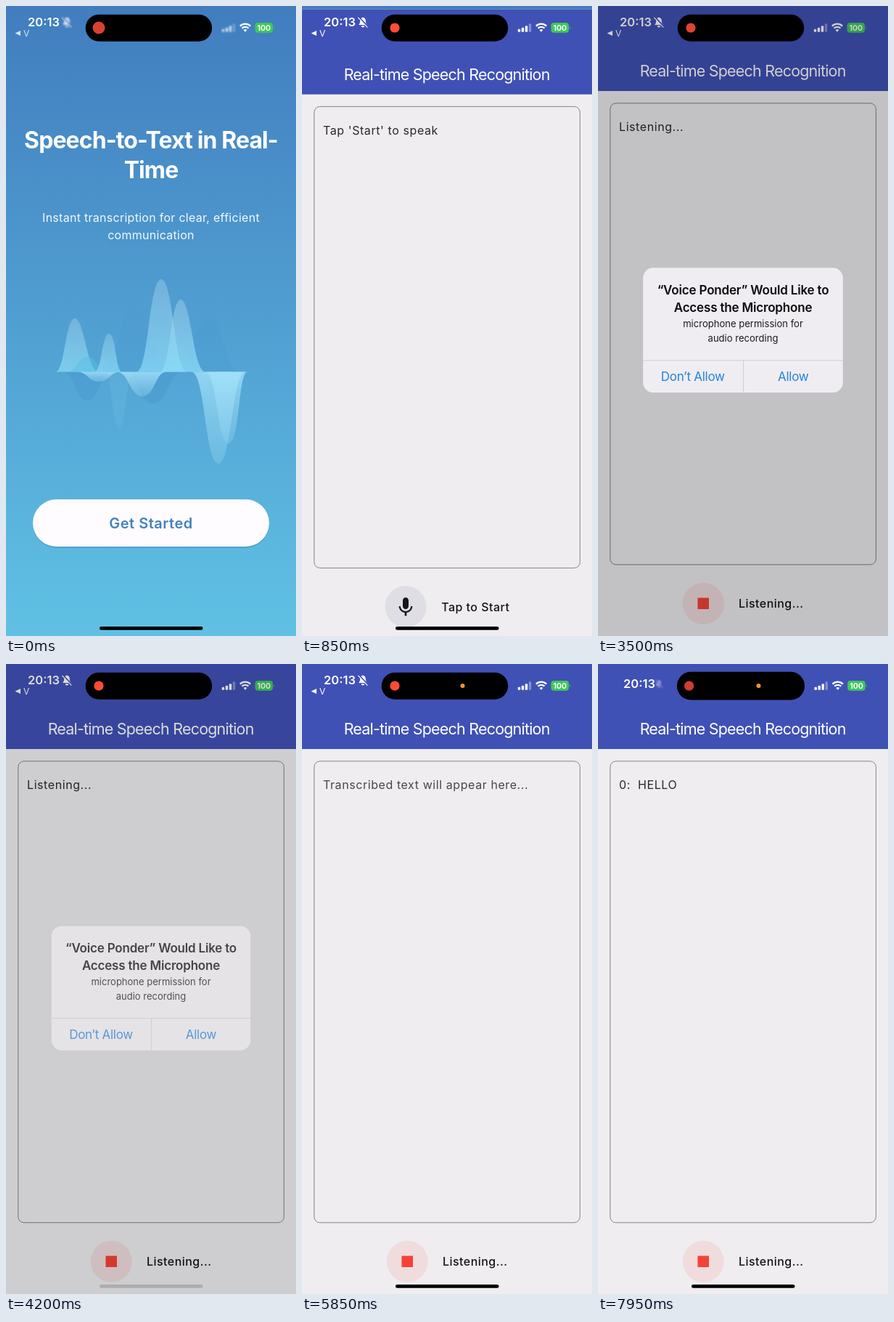
These frames come from a looping animation (400 by 867 pixels, 8000 ms). An HTML page:

```html
<!DOCTYPE html>
<html lang="en">
<head>
<meta charset="utf-8">
<title>Speech-to-Text</title>
<style>
html, body { margin: 0; width: 100%; height: 100%; overflow: hidden; background: #efedf0; }
svg { display: block; width: 100%; height: 100%; font-family: Inter, "Noto Sans", sans-serif; }
.mid { text-anchor: middle; }
.w { fill: #fff; }
.head { font-size: 32px; font-weight: 700; letter-spacing: -.9px; }
.sub { font-size: 16px; letter-spacing: .28px; fill-opacity: .94; }
.cta { font-size: 20px; font-weight: 600; letter-spacing: .5px; fill: #4380be; }
.bar { font-size: 21.5px; letter-spacing: -.8px; }
.body { font-size: 16px; letter-spacing: .58px; fill: #29282b; }
.status { font-size: 16px; font-weight: 500; letter-spacing: .45px; fill: #141316; }
.ask { font-size: 17px; font-weight: 600; letter-spacing: -.2px; fill: #0b0a0c; }
.why { font-size: 13px; fill: #1c1b1e; }
.btn { font-size: 17px; letter-spacing: -.3px; fill: #2483dc; }
</style>
</head>
<body>
<svg viewBox="0 0 400 867" preserveAspectRatio="none">
  <defs>
    <linearGradient id="sky" x2="0" y2="1">
      <stop stop-color="#417dbf"/><stop offset="1" stop-color="#60c1e4"/>
    </linearGradient>
    <linearGradient id="up" x2="0" y2="1">
      <stop stop-color="#9fd0ea" stop-opacity=".5"/><stop offset="1" stop-color="#8adcf8" stop-opacity=".85"/>
    </linearGradient>
    <linearGradient id="down" x2="0" y2="1">
      <stop stop-color="#a4e4fb" stop-opacity=".9"/><stop offset="1" stop-color="#93d3ee" stop-opacity=".4"/>
    </linearGradient>
    <filter id="soft" x="-50%" y="-50%" width="200%" height="200%">
      <feGaussianBlur id="blur" stdDeviation="0"/>
    </filter>
  </defs>

  <g id="welcome">
    <rect width="400" height="867" fill="url(#sky)"/>
    <g class="w mid">
      <text class="head" x="200" y="196">Speech-to-Text in Real-</text>
      <text class="head" x="200" y="237">Time</text>
      <text class="sub" x="200" y="297">Instant transcription for clear, efficient</text>
      <text class="sub" x="200" y="321">communication</text>
    </g>
    <g id="waves"></g>
    <rect x="37" y="680.5" width="326" height="65" rx="32.5" fill="#2c6c9c" opacity=".4"/>
    <rect x="37" y="679" width="326" height="65" rx="32.5" fill="#fefcff"/>
    <text class="cta mid" x="200" y="719">Get Started</text>
  </g>

  <g id="page">
    <rect width="400" height="867" fill="#efedf0"/>
    <rect width="400" height="117" fill="#4051b5"/>
    <text class="bar w mid" x="199.6" y="97">Real-time Speech Recognition</text>
    <rect x="16.8" y="133.8" width="366.6" height="635" rx="8" fill="none" stroke="#858387"/>
    <text id="out" class="body" x="29" y="172"></text>
    <g id="idle">
      <circle cx="143" cy="822" r="28.5" fill="#dfdee5"/>
      <path transform="translate(127 806.7) scale(1.333)" fill="#17161a" d="M12 14c1.66 0 2.99-1.34 2.99-3L15 5c0-1.66-1.34-3-3-3S9 3.34 9 5v6c0 1.66 1.34 3 3 3zm5.3-3c0 3-2.54 5.1-5.3 5.1S6.7 14 6.7 11H5c0 3.41 2.72 6.23 6 6.72V21h2v-3.28c3.28-.48 6-3.3 6-6.72h-1.7z"/>
      <text class="status" x="192.3" y="828">Tap to Start</text>
    </g>
    <g id="live">
      <circle cx="145.3" cy="822.3" r="28.5" fill="#f0dcdd"/>
      <rect x="137.5" y="814.5" width="15.5" height="15.5" fill="#f44336"/>
      <text class="status" x="194" y="828">Listening...</text>
    </g>
  </g>

  <g id="tray" class="w">
    <g id="clock"><text x="30" y="28" font-size="16.5" font-weight="600">20:13</text></g>
    <g id="bell">
      <path d="M78 26c2-1.8 2-3.6 2.2-6 .2-2.600 1.700-4.200 3.800-4.200s3.600 1.600 3.800 4.200c.2 2.400.2 4.200 2.200 6zM81.800 27.200h4.400a2.200 2.200 0 0 1-4.400 0z"/>
      <path d="M78.600 15.500 91 28.500" stroke="#4051b5" stroke-width="2"/>
      <path d="M77.600 16.200 90 29.200" stroke="#fff" stroke-width="1.200" stroke-linecap="round"/>
    </g>
    <g id="back">
      <path d="M12.500 37.500 20 34v7z"/>
      <text x="24" y="42" font-size="12">V</text>
    </g>
    <g id="radio">
      <g id="bars"></g>
      <g fill="none" stroke="#fff" stroke-width="2.300">
        <path d="M322.800 27.600a10.300 10.300 0 0 1 14.400 0M325.500 30.600a6.500 6.500 0 0 1 9 0"/>
      </g>
      <path d="M327.600 33.100a3.600 3.600 0 0 1 4.800 0L330 35.700z"/>
      <rect x="343.500" y="23" width="24.500" height="13.800" rx="4" fill="#3dc95a"/>
      <path d="M368.900 28v4q1.500-.6 1.500-2t-1.500-2" fill="#3dc95a" opacity=".7"/>
      <text class="mid" x="355.800" y="33.800" font-size="10.500" font-weight="700">100</text>
    </g>
  </g>
  <rect id="dim" width="400" height="867"/>
  <rect id="island"/>
  <circle id="rec" cy="30"/>
  <circle id="mic" cx="221.500" cy="30" r="3" fill="#f59425"/>

  <g id="alert">
    <rect x="62.700" y="360.700" width="274.600" height="171" rx="14" fill="#efedf1"/>
    <g class="mid">
      <text class="ask" x="200" y="397">“Voice Ponder” Would Like to</text>
      <text class="ask" x="200" y="421">Access the Microphone</text>
      <text class="why" x="200" y="442">microphone permission for</text>
      <text class="why" x="200" y="462">audio recording</text>
      <text class="btn" x="131" y="516">Don’t Allow</text>
      <text class="btn" x="269" y="516">Allow</text>
    </g>
    <path d="M62.700 487.500h274.600M200.500 487.500v44" stroke="#cfcdd2"/>
  </g>
  <rect id="home" x="129" y="854" width="142.500" height="4.800" rx="2.400"/>
</svg>
<script>
const LOOP = 8000;
const $ = id => document.getElementById(id);
const set = (id, attrs) => { for (const k in attrs) $(id).setAttribute(k, attrs[k]); };
const ramp = (t, from, len) => Math.min(1, Math.max(0, (t - from) / len));
const smooth = p => p * p * (3 - 2 * p);
const easeOut = p => 1 - (1 - p) ** 3;
const mix = (a, b, p) => a + (b - a) * p;

// Cubic Bézier easing, solved by bisection.
function bezier(x1, y1, x2, y2, x) {
  const at = (a, b, s) => 3 * (1 - s) ** 2 * s * a + 3 * (1 - s) * s * s * b + s ** 3;
  let lo = 0, hi = 1;
  for (let i = 0; i < 24; i++) {
    const s = (lo + hi) / 2;
    if (at(x1, x2, s) < x) lo = s; else hi = s;
  }
  return at(y1, y2, lo);
}

// Bell from x0 to x1 with its tip at (xm, y), standing on the centre line.
function bell(x0, xm, x1, y, fill, opacity) {
  const b = 503.5, l = (x0 + xm) / 2, r = (xm + x1) / 2;
  return `<path d="M${x0} ${b}C${l} ${b} ${l} ${y} ${xm} ${y}S${r} ${b} ${x1} ${b}z" fill="${fill}" opacity="${opacity}"/>`;
}
const UP = 'url(#up)', DOWN = 'url(#down)', DARK = '#3f8fca';
$('waves').innerHTML = [
  [130, 178, 226, 415, DARK, .13], [235, 279, 323, 430, DARK, .15],
  [78, 112, 146, 543, DARK, .3], [162, 203, 244, 547, DARK, .3],
  [136, 156, 176, 580, '#7cc8e8', .2],
  [68, 95, 128, 430, UP, .85], [84, 112, 140, 483, '#58bfe2', .5],
  [122, 142, 160, 451, UP, .85], [180, 214, 250, 376, UP, .85], [212, 241, 275, 404, UP, .9],
  [98, 128, 158, 517, DOWN, .9], [152, 188, 222, 537, DOWN, .9],
  [256, 293, 330, 630, DOWN, .85], [275, 307, 333, 602, DOWN, .85]
].map(b => bell(...b)).join('');

$('bars').innerHTML = [4, 6, 8.5, 11.5].map((h, i) =>
  `<rect x="${297.8 + i * 5}" y="${35.8 - h}" width="3.4" height="${h}" rx="1" opacity="${i < 3 ? 1 : .35}"/>`).join('');

const TAP = 2150, HINT = 4700, PULSE = 1650;
const LINES = [
  [0, "Tap 'Start' to speak"], [TAP, 'Listening...'],
  [HINT, 'Transcribed text will appear here...'], [7250, '0:\u00a0 HELLO']
];

function draw(t) {
  const slide = bezier(.25, .1, .25, 1, ramp(t, 580, 300));
  set('page', { transform: `translate(0 ${867 * (1 - slide)})` });

  const [from, line] = LINES.filter(l => t >= l[0]).pop();
  $('out').textContent = line;
  set('out', { 'fill-opacity': from === HINT ? .85 : 1 });
  const live = t >= TAP;
  set('idle', { opacity: live ? 0 : 1 });
  set('live', { opacity: live ? 1 : 0 });

  const shown = easeOut(ramp(t, 3150, 500)), gone = smooth(ramp(t, 4150, 140));
  const alert = shown * (1 - gone), size = mix(1.15, 1, shown);
  set('dim', { opacity: .195 * alert });
  set('alert', {
    opacity: Math.min(1, shown * 1.5) * (1 - gone),
    transform: `translate(200 446) scale(${size}) translate(-200 -446)`
  });
  set('home', { opacity: 1 - ramp(t, 3150, 300) + smooth(ramp(t, 4100, 400)) });
  set('mic', { opacity: ramp(t, 4600, 200) });

  // The tray settles at the start and swaps its layout at the end.
  const settle = easeOut(ramp(t, 0, 350)), leave = smooth(ramp(t, 7730, 220));
  const blur = 1.1 * (1 - settle) + 1.3 * leave;
  $('blur').setAttribute('stdDeviation', blur);
  const filter = blur > .02 ? 'url(#soft)' : 'none';
  set('clock', { transform: `translate(${5 * leave} ${5 * leave})` });
  set('bell', {
    filter, opacity: mix(.75, 1, settle) * mix(1, .5, leave),
    transform: `translate(84 ${22 + 5 * leave}) scale(${mix(1, .75, leave)}) translate(-84 -22)`
  });
  set('back', { opacity: mix(.8, 1, settle) * (1 - leave) });
  set('bars', { filter: settle < 1 ? filter : 'none', opacity: mix(.7, 1, settle) });
  set('radio', { transform: `translate(${.7 * leave} 0)` });

  const grow = .9 * leave;
  set('island', {
    x: 109.7 - grow, y: 11.7 - grow, width: 174.5 + 2 * grow, height: 37 + 2 * grow, rx: 18.5 + grow
  });
  // The recording dot glows in a slow pulse.
  const glow = .5 - .5 * Math.cos(2 * Math.PI * t / PULSE);
  const red = mix(mix(218, 255, glow), 208, leave);
  set('rec', {
    cx: 128 - 2.4 * leave, r: mix(8.5, 6.6, settle),
    fill: `rgb(${red} ${red * .3} ${red * .23})`
  });
}

function tick(now) {
  draw(now % LOOP);
  requestAnimationFrame(tick);
}
draw(0);
requestAnimationFrame(tick);
</script>
</body>
</html>
```
